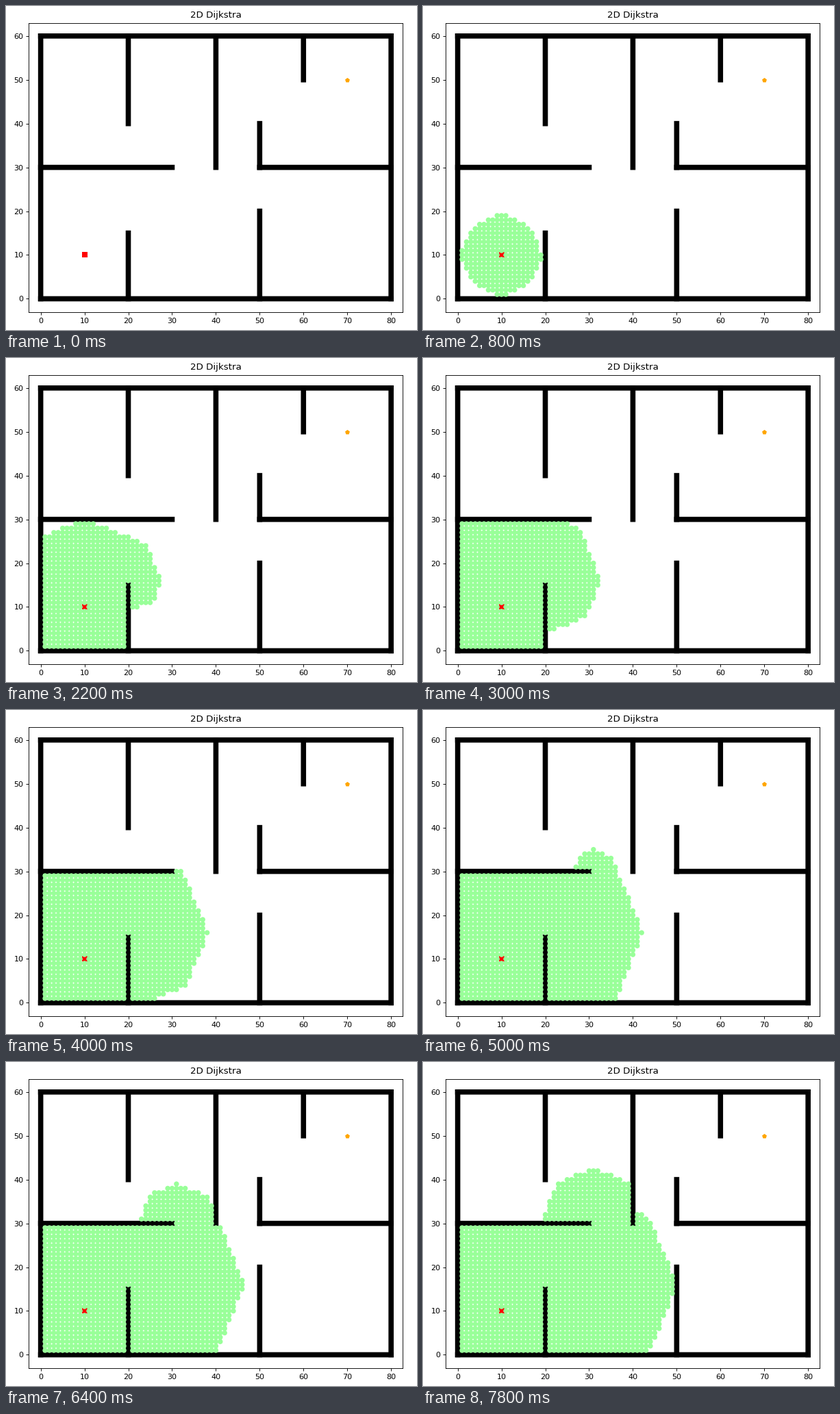
A matplotlib script for the animation above (8000 ms loop, 600 by 473 pixels).

```python
import numpy as np
import matplotlib.pyplot as plt
from matplotlib.animation import FuncAnimation
from matplotlib.collections import LineCollection
from matplotlib.colors import to_rgba

W, H, DPI = 600, 473, 80
FRAMES, INTERVAL = 40, 200
NX, NY = 80, 60
START, GOAL = (10, 10), (70, 50)
GREEN = "#99ff99"
UNIT = 6.394                      # pixels per grid cell
LEFT, RIGHT, TOP, BOTTOM = 33.4, 579.4, 24.6, 446.6


def wall_x(x, y0, y1):
    return (x, y0), (x, y1)


def wall_y(y, x0, x1):
    return (x0, y), (x1, y)


WALLS = [
    *(wall_x(x, 0, NY) for x in (0, NX)),
    *(wall_y(y, 0, NX) for y in (0, NY)),
    wall_y(30, 0, 30), wall_y(30, 50, NX),
    wall_x(20, 0, 15), wall_x(50, 0, 20), wall_x(50, 30, 40),
    *(wall_x(x, y, NY) for x, y in ((20, 40), (40, 30), (60, 50))),
]


def free_cells():
    free = np.ones((NX + 1, NY + 1), bool)
    for (x0, y0), (x1, y1) in WALLS:
        free[x0:x1 + 1, y0:y1 + 1] = False
    return free


def path_costs(free):
    """Shortest 8-connected path costs, without cutting wall corners."""
    moves = []
    for dx in (-1, 0, 1):
        for dy in (-1, 0, 1):
            if dx or dy:
                ok = free & np.roll(free, dx, 0) & np.roll(free, dy, 1)
                moves.append((dx, dy, ok))
    cost = np.full(free.shape, np.inf)
    cost[START] = 0
    while True:
        best = cost.copy()
        for dx, dy, ok in moves:
            step = np.roll(best, (dx, dy), (0, 1)) + np.hypot(dx, dy)
            best = np.where(ok, np.minimum(best, step), best)
        if np.array_equal(best, cost):
            return cost
        cost = best


def visit_count(frame):
    """The search slows down as more cells have been drawn."""
    return round(frame * (66.95 - 1.0891 * frame + 0.009954 * frame ** 2))


def visited_cells():
    """Cells by cost, ties by x and then y, as a heap of tuples yields them."""
    cost = path_costs(free_cells())
    x, y = np.nonzero((cost > 0) & np.isfinite(cost))
    order = np.lexsort((y, x, np.round(cost[x, y], 6)))
    order = order[:visit_count(FRAMES - 1)]
    return x[order], y[order]


fig = plt.figure(figsize=(W / DPI, H / DPI), dpi=DPI, facecolor="white")
ax = fig.add_axes([LEFT / W, 1 - BOTTOM / H,
                   (RIGHT - LEFT) / W, (BOTTOM - TOP) / H])
half = (RIGHT - LEFT) / UNIT / 2
ax.set_xlim(NX / 2 - half, NX / 2 + half)
ax.set_ylim(-3, NY + 3)
ax.set_xticks(range(0, NX + 1, 10))
ax.set_yticks(range(0, NY + 1, 10))
ax.tick_params(axis="x", pad=4.3)
ax.set_title("2D Dijkstra", pad=7)


def points(pixels):
    return pixels * 72 / DPI


ax.add_collection(LineCollection(WALLS, colors="black", snap=False,
                                 linewidths=points(7.6),
                                 capstyle="projecting", zorder=2),
                  autolim=False)
for cell, marker, color in ((START, "s", "red"), (GOAL, "p", "orange")):
    ax.scatter(*cell, s=points(7.2) ** 2, marker=marker, color=color,
               linewidths=0, zorder=2.1)

xs, ys = visited_cells()
dots = ax.scatter(xs, ys, s=points(7.4) ** 2, linewidths=0, zorder=3)
shown, hidden = np.array(to_rgba(GREEN)), np.array(to_rgba(GREEN, 0))


def draw(frame):
    visible = np.arange(len(xs)) < visit_count(frame)
    dots.set_facecolors(np.where(visible[:, None], shown, hidden))
    return [dots]


anim = FuncAnimation(fig, draw, frames=FRAMES, interval=INTERVAL,
                     init_func=lambda: draw(0), repeat=True, repeat_delay=0,
                     blit=False)
plt.show()
```
